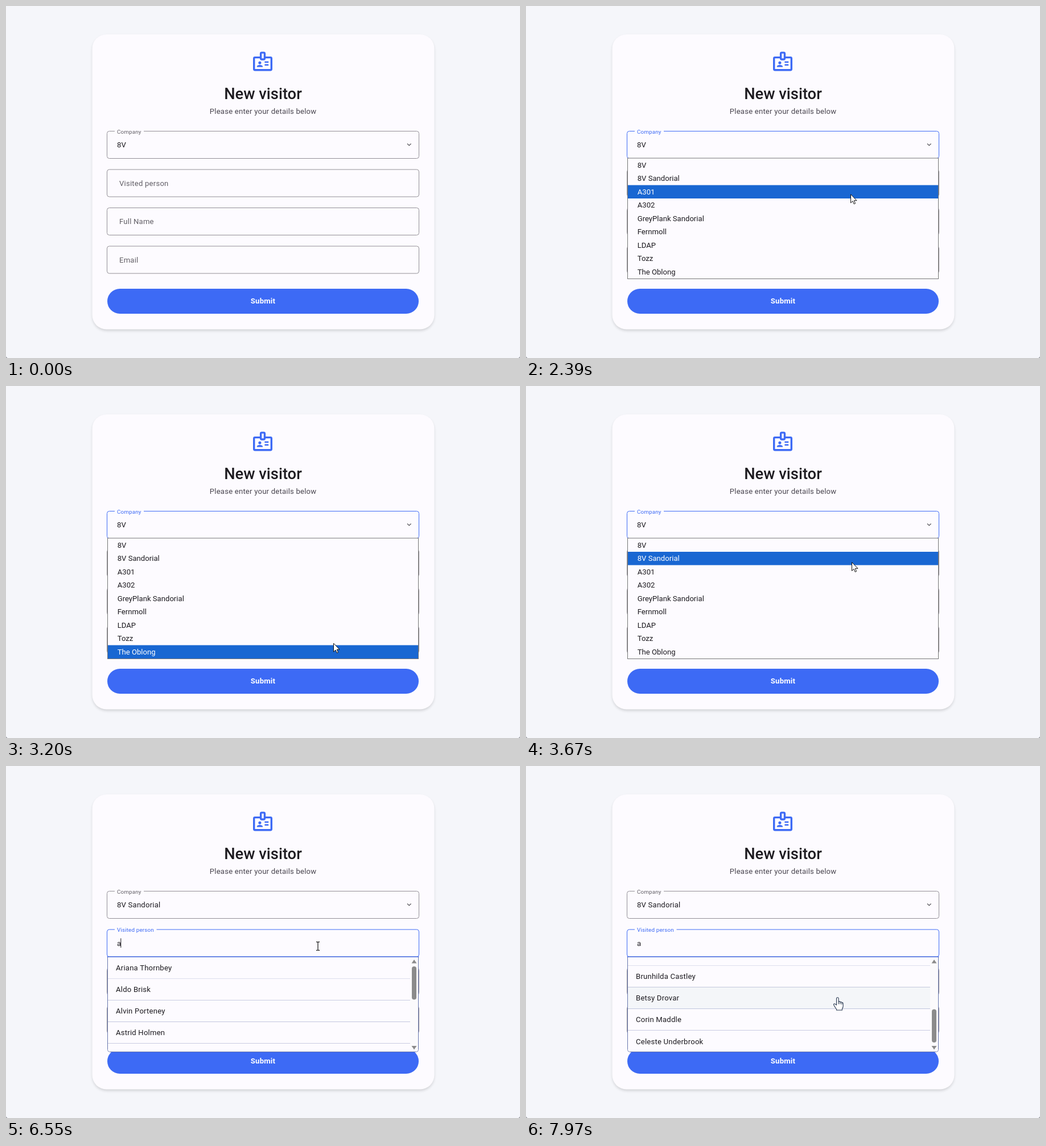
These frames come from a looping animation (903 by 620 pixels, 8 s). An HTML page:

```html
<!DOCTYPE html>
<html lang="en">
<head>
<meta charset="utf-8">
<title>New visitor</title>
<style>
  html, body { margin: 0; width: 100%; height: 100%; overflow: hidden; background: #f5f6fa; }
  svg { display: block; }
  text { font: 13.13px Roboto, sans-serif; fill: #1d1b20; white-space: pre; }
  .spaced { letter-spacing: .2px; }
  .hint { fill: #625f66; }
  .line { fill: none; stroke-width: 1; }
</style>
</head>
<body>
<svg id="stage" width="903" height="620" viewBox="0 0 903 620">
  <defs>
    <filter id="soft" x="-10%" y="-10%" width="120%" height="120%"><feGaussianBlur stdDeviation="2.4"/></filter>
    <clipPath id="panelClip"><path d="M179 337H724V499a4 4 0 0 1 -4 4H183a4 4 0 0 1 -4 -4Z"/></clipPath>
  </defs>
  <rect width="903" height="620" fill="#f5f6fa"/>
  <path d="M0 617Q.5 619.5 3 620H0ZM903 617Q902.500 619.500 900 620H903Z" fill="#8d8f96"/>
  <rect x="152" y="53" width="600" height="519" rx="25" fill="#000" opacity=".15" filter="url(#soft)"/>
  <rect x="151.500" y="50" width="601" height="519.500" rx="25" fill="#fdfbff"/>
  <g transform="translate(430.600 77) scale(1.7)" fill="#3d6af5">
    <path fill-rule="evenodd" d="M20 7H15V4A2 2 0 0 0 13 2H11A2 2 0 0 0 9 4V7H4A2 2 0 0 0 2 9V20A2 2 0 0 0 4 22H20A2 2 0 0 0 22 20V9A2 2 0 0 0 20 7ZM11 4H13V9H11ZM20 20H4V9H9A2 2 0 0 0 11 11H13A2 2 0 0 0 15 9H20Z"/>
    <circle cx="9" cy="13.500" r="1.500"/>
    <path d="M6 18v-.6c0-1.200 2-1.700 3-1.700s3 .5 3 1.700V18ZM14 12h4v1.500h-4ZM14 15h4v1.500h-4Z"/>
  </g>
  <text x="451.500" y="163.500" text-anchor="middle" style="font-size:27.3px;font-weight:500">New visitor</text>
  <text x="451.600" y="189.500" text-anchor="middle" class="spaced" style="fill:#49454f">Please enter your details below</text>
  <g id="form"></g>
  <rect x="178" y="498" width="547" height="44" rx="22" fill="#3d6af5"/>
  <text x="451.500" y="524" text-anchor="middle" class="spaced" style="fill:#fff;font-weight:700">Submit</text>
  <g id="menu"></g>
  <g id="panel"></g>
  <g id="pointer"></g>
</svg>
<script>
const LOOP = 8000, BLUE = '#3d6af5', GREY = '#939096', DARK = '#1d1b20', PAPER = '#fdfbff';
const OPEN = 1630, PICK = 4440, FOCUS = 5060, TYPED = 6170, LIST = 6550;
const ROW = 23.5, MENU_TOP = 268.5, ITEM = 38.2, PANEL_TOP = 336, SCROLL_MAX = 214;
const FIRM = '8V Sandorial';
const options = ['8V', FIRM, 'A301', 'A302', 'GreyPlank Sandorial', 'Fernmoll', 'LDAP', 'Tozz', 'The Oblong'];
const people = ['Ariana Thornbey', 'Aldo Brisk', 'Alvin Porteney', 'Astrid Holmen', 'Amelia Morant',
  'Amabel Ost', 'Brunhilda Castley', 'Betsy Drovar', 'Corin Maddle', 'Celeste Underbrook'];

// time, x, y of the pointer
const path = [
  [90, 852, 578], [130, 836, 490], [180, 792, 345], [230, 774, 288], [720, 774, 288],
  [800, 742, 283], [960, 620, 258], [1090, 567, 247], [1850, 567, 247], [2150, 568, 285],
  [2390, 570, 331], [2420, 571, 340], [2650, 574, 410], [2900, 575, 466], [3130, 575, 466],
  [3200, 575, 453], [3450, 573, 370], [3600, 572, 314], [3670, 572, 310], [4880, 572, 310],
  [5040, 548, 317], [7130, 548, 317], [7400, 547, 408]
];

const $ = id => document.getElementById(id);
function add(parent, tag, attrs, label) {
  const el = document.createElementNS('http://www.w3.org/2000/svg', tag);
  set(el, attrs);
  if (label) el.textContent = label;
  parent.appendChild(el);
  return el;
}
function set(el, attrs) { for (const k in attrs) el.setAttribute(k, attrs[k]); }
const show = (el, on) => set(el, { visibility: on ? 'inherit' : 'hidden' });
const clamp = v => Math.max(0, Math.min(1, v));
const ease = (t, a, b) => { const u = clamp((t - a) / (b - a)); return u * u * (3 - 2 * u); };
const mix = (a, b, u) => a + (b - a) * u;

function pointerAt(t) {
  let i = 0;
  while (i < path.length - 1 && path[i + 1][0] <= t) i++;
  const a = path[i], b = path[i + 1] || a;
  const u = a === b ? 0 : clamp((t - a[0]) / (b[0] - a[0]));
  return [mix(a[1], b[1], u), mix(a[2], b[2], u)];
}

// Outline of a field, with a gap in the top edge for its small label
function outline(y, gapEnd) {
  return `M${gapEnd} ${y}H721.500a4 4 0 0 1 4 4v40a4 4 0 0 1 -4 4H181.500a4 4 0 0 1 -4 -4v-40a4 4 0 0 1 4 -4H191`;
}

const form = $('form');
const fields = [220.5, 288, 355.5, 423].map((y, i) =>
  add(form, 'path', { class: 'line', d: outline(y, i ? 191 : 242), stroke: GREY }));
const firmLabel = add(form, 'text', { class: 'spaced', transform: 'translate(195 224.500) scale(.75)' }, 'Company');
const firm = add(form, 'text', { class: 'spaced', x: 195, y: 249 }, '8V');
add(form, 'path', { class: 'line', d: 'M705 242.500l3.300 3.200 3.300-3.200', stroke: '#56535a', style: 'stroke-width:1.2' });
const personLabel = add(form, 'text', { class: 'spaced' }, 'Visited person');
add(form, 'text', { class: 'spaced hint', x: 199, y: 384.3 }, 'Full Name');
add(form, 'text', { class: 'spaced hint', x: 199, y: 451.8 }, 'Email');
const typed = add(form, 'text', { class: 'spaced', x: 195, y: 316.7 }, 'a');
const caret = add(form, 'rect', { y: 303.5, width: 1, height: 16.5, fill: DARK });

const menu = $('menu');
add(menu, 'rect', { x: 178.5, y: 268, width: 546, height: 212.5, fill: PAPER });
const bar = add(menu, 'rect', { x: 179, width: 545, height: ROW, fill: '#1967d2' });
add(menu, 'rect', { x: 178.5, y: 268, width: 546, height: 212.5, class: 'line', stroke: '#767676' });
const choices = options.map((name, i) => add(menu, 'text', { x: 195.7, y: 284.7 + i * ROW }, name));

const panel = $('panel');
add(panel, 'path', { d: 'M178.500 336H724.500V499.500a4 4 0 0 1 -4 4H182.500a4 4 0 0 1 -4 -4Z', fill: PAPER, stroke: '#6877ad' });
const view = add(panel, 'g', { 'clip-path': 'url(#panelClip)' });
const list = add(view, 'g', {});
const rows = people.map((name, i) => {
  const y = PANEL_TOP + i * ITEM;
  const back = add(list, 'rect', { x: 179, y, width: 531, height: ITEM, fill: PAPER });
  add(list, 'text', { class: 'spaced', x: 193, y: y + 23.7 }, name);
  add(list, 'path', { class: 'line', d: `M179 ${y + ITEM + .3}H710`, stroke: '#5d6ca3' });
  return back;
});
add(view, 'rect', { x: 710, y: 337, width: 14, height: 167, fill: '#fbfafc' });
add(view, 'path', { d: 'M712.500 347.500l4.500-6.500 4.500 6.500ZM712.500 493l4.500 6.500 4.500-6.500Z', fill: '#8b8b8b' });
const thumb = add(view, 'rect', { x: 713, width: 8, height: 58.5, rx: 4, fill: '#8b8b8b' });
add(panel, 'path', { class: 'line', d: 'M177.500 336H725.500', stroke: BLUE });

const pointer = $('pointer');
const shapes = {
  arrow: add(pointer, 'path', { d: 'M.5 .5V15.500L4 12.300 6.200 17.500 8.500 16.500 6.300 11.400H11Z', fill: '#fff', stroke: '#111' }),
  beam: add(pointer, 'path', { d: 'M-3 -7.200H-1.200L0 -6.400 1.200 -7.200H3M0 -6.400V6.900M-3 7.700H-1.200L0 6.900 1.200 7.700H3', fill: 'none', stroke: '#111', 'stroke-width': 1.2 }),
  hand: add(pointer, 'path', {
    d: 'M-1.500 13V1.500a1.800 1.800 0 0 1 3.600 0V7q2-1 2.900 .8 2-.8 2.900 .9 2.200-.4 2.200 1.700V15q0 2.500-1.700 4.500V22H-1.500V20.500Q-4 17-6 13.500q-1.200-2.200 .6-2.700 1.600-.3 3.900 2.700M2.100 7V11.500M5 8V11.500M7.900 9V12',
    fill: '#fff', stroke: '#26364f', 'stroke-width': 1.1, 'stroke-linejoin': 'round' })
};

function caretOn(t) {
  if (t < FOCUS) return false;
  const since = t < TYPED ? t - FOCUS : t - TYPED;
  return Math.floor(since / 528) % 2 === 0;
}

function draw(t) {
  const [x, y] = pointerAt(t);
  const menuOpen = t >= OPEN && t < PICK, listOpen = t >= LIST;
  const inside = top => t >= 90 && !menuOpen && x > 177 && x < 726 && y > top && y < top + 48.5;
  const firmFocus = t >= OPEN && t < FOCUS, personFocus = t >= FOCUS;

  set(fields[0], { stroke: firmFocus ? BLUE : inside(220) ? DARK : GREY });
  firmLabel.style.fill = firmFocus ? BLUE : '#625f66';
  firm.textContent = t < PICK ? '8V' : FIRM;

  const lift = ease(t, FOCUS, FOCUS + 190);
  set(fields[1], { stroke: personFocus ? BLUE : inside(288) ? DARK : GREY, d: outline(288, mix(191, 264.5, lift)) });
  set(personLabel, { transform: `translate(${mix(199, 195, lift)} ${mix(316.7, 292, lift)}) scale(${mix(1, .75, lift)})` });
  personLabel.style.fill = personFocus ? BLUE : '#625f66';
  show(typed, t >= TYPED);
  show(caret, caretOn(t));
  set(caret, { x: t < TYPED ? 195 : 201.3 });

  show(menu, menuOpen);
  const hot = Math.max(0, Math.min(8, Math.floor((pointerAt(t - 30)[1] - MENU_TOP) / ROW)));
  set(bar, { y: MENU_TOP + hot * ROW });
  choices.forEach((c, i) => { c.style.fill = i === hot ? '#fff' : DARK; });

  show(panel, listOpen);
  const scroll = SCROLL_MAX * ease(t, 7440, 7910);
  const over = y > PANEL_TOP ? Math.floor((y - PANEL_TOP + scroll) / ITEM) : -1;
  set(list, { transform: `translate(0 ${-scroll})` });
  rows.forEach((r, i) => set(r, { fill: i === over ? '#f4f6f9' : PAPER }));
  set(thumb, { y: 353 + 75.5 * scroll / SCROLL_MAX });

  const kind = listOpen && y > PANEL_TOP ? 'hand' : inside(288) ? 'beam' : 'arrow';
  for (const k in shapes) show(shapes[k], k === kind);
  show(pointer, t >= 90);
  set(pointer, { transform: `translate(${x} ${y})` });
}

function tick() {
  draw(performance.now() % LOOP);
  requestAnimationFrame(tick);
}
tick();
</script>
</body>
</html>
```
